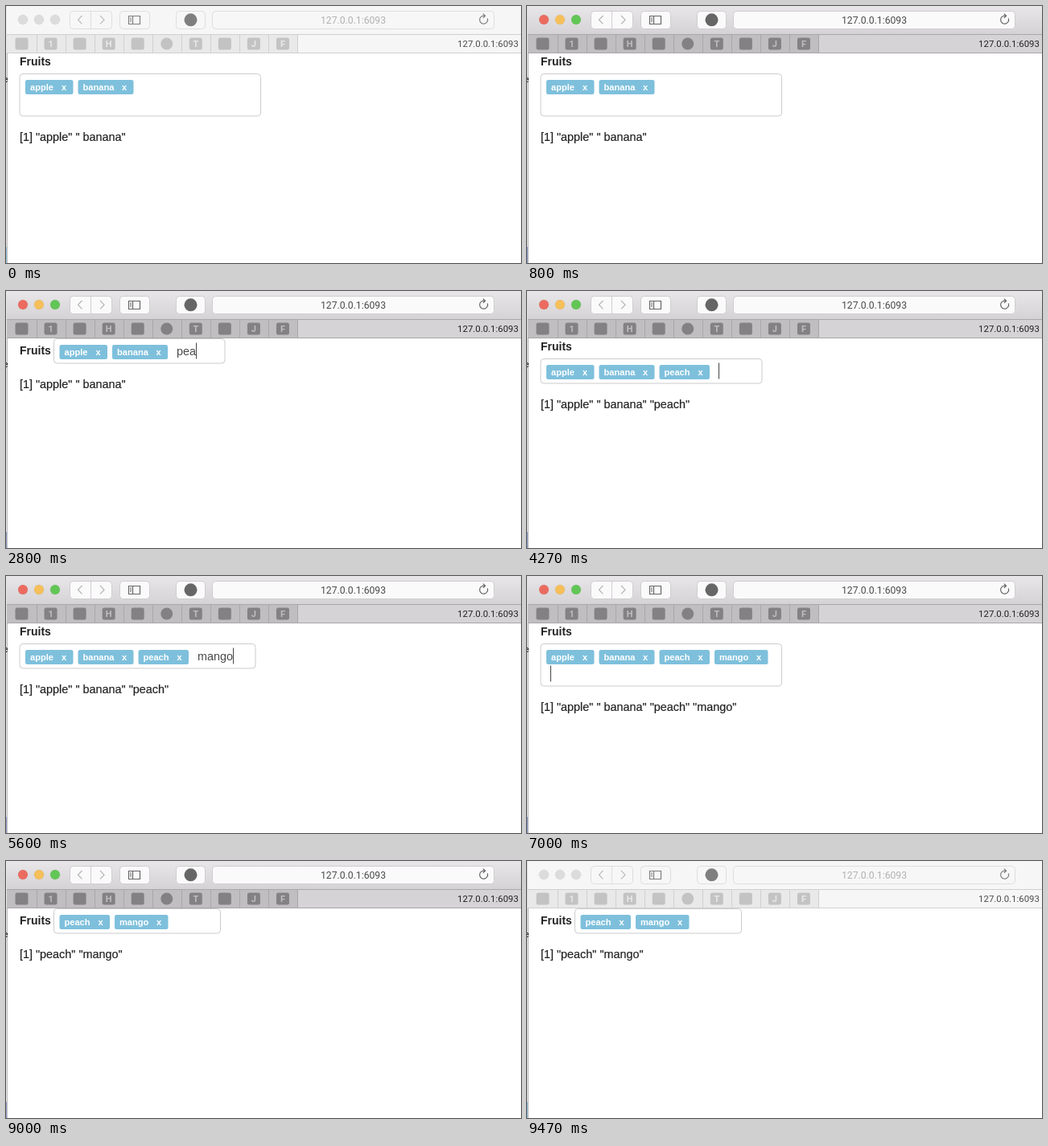
Write an HTML page that moves like this. It is 640 by 320 pixels and loops after 9.54 s.

```html
<!DOCTYPE html>
<html lang="en">
<head>
<meta charset="utf-8">
<title>Fruits</title>
<style>
  html, body { margin: 0; width: 100%; height: 100%; overflow: hidden; background: #fff; }
  svg {
    display: block; width: 640px; height: 320px;
    --bar-top: #e8e6e8; --bar-low: #d4d2d4; --tabs: #c0bec0; --tab: #d5d3d5;
    --line: #a9a7a9; --icon: #838183; --field: #fbfafb; --edge: #cfcdcf;
    --url: #4b4b4b; --tab-text: #222; --glyph: #666; --back: #b4b4b4; --corner: #8f9ccb;
  }
  svg.inactive {
    --bar-top: #f6f6f6; --bar-low: #f6f6f6; --tabs: #e9e9e9; --tab: #f6f6f6;
    --line: #d0d0d0; --icon: #c3c3c3; --field: #f7f7f7; --edge: #dedede;
    --url: #b2b2b2; --tab-text: #4c4c4c; --glyph: #7f7f7f; --back: #bcbcbc; --corner: #8fc1dc;
  }
  text { font-family: "Liberation Sans", Arial, sans-serif; font-size: 14.4px; fill: #222; white-space: pre; }
  .ui { font-family: Roboto, Inter, sans-serif; text-anchor: middle; }
  .url { font-size: 12.2px; fill: var(--url); }
  .tab-text { font-size: 11.4px; fill: var(--tab-text); }
  .letter { font: bold 11px Roboto, Inter, sans-serif; fill: var(--tabs); text-anchor: middle; }
  .icon { fill: var(--icon); }
  .line { stroke: var(--line); }
  .control { fill: var(--field); stroke: var(--edge); }
  .glyph { fill: none; stroke: var(--glyph); stroke-width: 1.2; }
  .back { fill: none; stroke: var(--back); stroke-width: 1.2; }
  .light { stroke: #0001; stroke-width: .6; }
  .inactive .light { fill: #dcdcdc; }
  .label { font-size: 14px; font-weight: bold; }
  .chip rect { fill: #7ec0dc; }
  .chip text { font-size: 11.1px; font-weight: bold; fill: #fff; }
  #output { stroke: #222; stroke-width: .2; }
  #typed { fill: #4a4a4a; }
</style>
</head>
<body>
<svg id="stage" viewBox="0 0 640 320">
  <defs>
    <linearGradient id="bar" x2="0" y2="1">
      <stop style="stop-color:var(--bar-top)"/>
      <stop offset="1" style="stop-color:var(--bar-low)"/>
    </linearGradient>
  </defs>
  <rect width="640" height="320" fill="#fff"/>
  <rect width="2" height="320" fill="#e4e4e4"/>
  <rect y="300" width="2" height="20" style="fill:var(--corner)"/>
  <path d="M1.5 59V320" stroke="#bbb"/>
  <text x="-3.4" y="95" style="font-size:11px;fill:#000">e</text>

  <rect x="1" width="639" height="36" fill="url(#bar)"/>
  <rect x="1" y="36" width="361" height="22" style="fill:var(--tabs)"/>
  <rect x="362" y="36" width="278" height="22" style="fill:var(--tab)"/>
  <path class="line" d="M1 35.5H640M1 58.5H640"/>
  <circle class="light" cx="21" cy="17" r="6" fill="#ec6b60"/>
  <circle class="light" cx="41" cy="17" r="6" fill="#f5bf5a"/>
  <circle class="light" cx="61" cy="17" r="6" fill="#62c656"/>
  <rect class="control" x="79.5" y="6.5" width="52" height="22" rx="4"/>
  <path d="M105.5 7V28" style="stroke:var(--edge)"/>
  <path class="back" d="M94.5 12l-5 5.2 5 5.2M117 12l5 5.2-5 5.2"/>
  <rect class="control" x="141.5" y="6.5" width="37" height="22" rx="4"/>
  <path class="glyph" d="M152.5 12.5h14v10h-14zM157.5 12.5v10M154 15h2M154 17h2M154 19h2"/>
  <rect class="control" x="211.5" y="6.5" width="36" height="22" rx="4"/>
  <circle cx="229.5" cy="17.3" r="8" style="fill:var(--glyph)"/>
  <rect class="control" x="256.5" y="6.5" width="350" height="22" rx="4"/>
  <text class="ui url" x="431.5" y="21.7">127.0.0.1:6093</text>
  <path class="glyph" d="M598.3 15.4a5 5 0 1 1-4.3-3.2h1.6M592.8 9.6l2.8 2.6-2.8 2.6"/>
  <g id="pins"></g>
  <text class="ui tab-text" x="599" y="51.2">127.0.0.1:6093</text>

  <text id="label" class="label" x="17">Fruits</text>
  <rect id="box" fill="#fff" stroke="#ccc" rx="4"/>
  <g id="chips"></g>
  <text id="typed"></text>
  <rect id="caret" width="1" height="20" fill="#444"/>
  <text id="output" x="17"></text>
</svg>
<script>
const LOOP = 9540, ACTIVE_FROM = 70, ACTIVE_TO = 9470, BLINK = 467;
const RIGHT_LIMIT = 318;
const chipWidth = { apple: 59.5, banana: 69, peach: 62.5, mango: 66.5 };
const $ = id => document.getElementById(id);

function make(tag, parent, attrs, text) {
  const el = document.createElementNS('http://www.w3.org/2000/svg', tag);
  place(el, attrs);
  if (text) el.textContent = text;
  return parent.appendChild(el);
}
function place(el, attrs) {
  for (const key in attrs) el.setAttribute(key, attrs[key]);
}

// Pinned tabs: a letter, a plain square or a plain circle
['square', '1', 'square', 'H', 'square', 'circle', 'T', 'square', 'J', 'F'].forEach((kind, i) => {
  const x = 19.5 + i * 36.05, pins = $('pins');
  if (kind === 'circle') make('circle', pins, { class: 'icon', cx: x, cy: 47, r: 7.5 });
  else make('rect', pins, { class: 'icon', x: x - 8, y: 39.5, width: 16, height: 15, rx: 2.5 });
  if (kind.length === 1) make('text', pins, { class: 'letter', x, y: 51 }, kind);
  make('path', pins, { class: 'line', d: `M${Math.round(x + 18) + .5} 36V58` });
});

const steps = [];
function step(at, tags, text = '', size = 1, caretFrom = at) {
  steps.push({ at, tags: tags.split(' '), text, size, caretFrom });
}
function type(at, every, tags, word) {
  for (let n = 1; n <= word.length; n++)
    step(at + (n - 1) * every, tags, word.slice(0, n), Math.max(1, n - 1));
}
step(0, 'apple banana', '', 20, ACTIVE_FROM);
type(2470, 135, 'apple banana', 'peach');
step(3870, 'apple banana peach');
type(4870, 130, 'apple banana peach', 'mango');
step(5930, 'apple banana peach mango');
step(7330, 'banana peach mango');
step(8270, 'peach mango', '', 1, 8470);

// The field sits beside its label if it fits, else below; its input wraps last.
function layout({ tags, size }) {
  const chips = tags.reduce((sum, tag) => sum + chipWidth[tag] + 6, 6);
  const needed = 7 + chips + 48 + size * 6;
  const tall = 17 + needed > RIGHT_LIMIT;
  const inline = 60 + needed <= RIGHT_LIMIT;
  const left = inline ? 59.5 : 17, top = inline ? 60 : 85;
  return {
    left, top, tall,
    width: tall ? 299.5 : needed - 1,
    height: tall ? 52.5 : 30.5,
    inputX: left + 6 + (tall ? 6 : chips),
    labelY: inline ? 79 : 74,
    outputY: inline ? 121 : tall ? 168 : 146
  };
}

function show(state) {
  const at = layout(state);
  place($('label'), { y: at.labelY });
  place($('box'), { x: at.left, y: at.top - .5, width: at.width, height: at.height });
  const chips = $('chips');
  chips.replaceChildren();
  let x = at.left + 7;
  for (const tag of state.tags) {
    const width = chipWidth[tag];
    const chip = make('g', chips, { class: 'chip', transform: `translate(${x} ${at.top + 7})` });
    make('rect', chip, { width, height: 18, rx: 2.5 });
    make('text', chip, { x: 6, y: 13 }, tag);
    make('text', chip, { x: width - 14.5, y: 13 }, 'x');
    x += width + 6;
  }
  const row = at.tall ? 22 : 0;
  $('typed').textContent = state.text;
  place($('typed'), { x: at.inputX, y: at.top + 20 + row });
  const textWidth = state.text ? $('typed').getComputedTextLength() : 0;
  place($('caret'), { x: Math.floor(at.inputX + textWidth), y: at.top + 4.5 + row });
  $('output').textContent = '[1] ' + state.tags.map(t => t === 'banana' ? '" banana"' : `"${t}"`).join(' ');
  place($('output'), { y: at.outputY });
}

let shown;
function frame() {
  const t = performance.now() % LOOP;
  const state = steps.findLast(s => s.at <= t);
  if (state !== shown) show(shown = state);
  const active = t >= ACTIVE_FROM && t < ACTIVE_TO;
  $('stage').classList.toggle('inactive', !active);
  const since = t - state.caretFrom;
  const lit = active && since >= 0 && Math.floor(since / BLINK) % 2 === 0;
  $('caret').style.visibility = lit ? 'visible' : 'hidden';
  requestAnimationFrame(frame);
}
frame();
</script>
</body>
</html>
```
